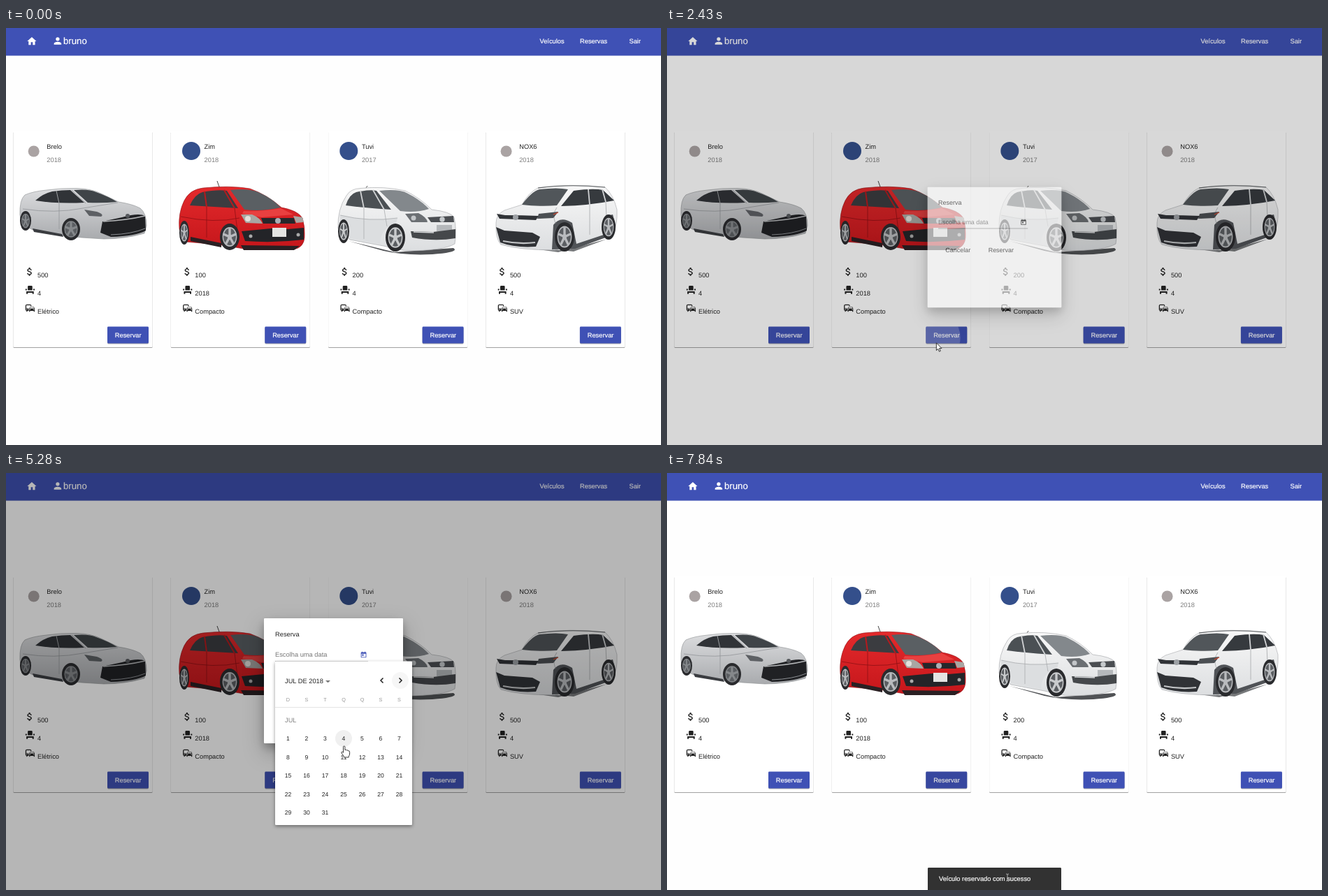
An HTML page for the animation above (8000 ms loop, 937x597 px).

```html
<!DOCTYPE html>
<html lang="pt">
<head>
<meta charset="utf-8">
<title>Reserva de veículos</title>
<style>
html, body { margin: 0; width: 100%; height: 100%; overflow: hidden; background: #fefefe; }
svg { display: block; width: 937px; height: 597px; }
text { font: 9.3px "Liberation Sans", Arial, sans-serif; text-rendering: geometricPrecision; white-space: pre; }
text[fill="#fff"] { stroke: #fff; stroke-width: .2px; }
.mid { text-anchor: middle; }
.card { filter: drop-shadow(0 1px .7px rgba(0,0,0,.36)); }
.raised { filter: drop-shadow(0 1px .7px rgba(0,0,0,.3)); }
.pressed { filter: drop-shadow(0 2.5px 2.5px rgba(0,0,0,.42)); }
.dialog { filter: drop-shadow(0 6px 6px rgba(0,0,0,.22)) drop-shadow(0 11px 14px rgba(0,0,0,.26)); }
.panel { filter: drop-shadow(0 2px 2.5px rgba(0,0,0,.42)); }
</style>
</head>
<body>
<svg id="stage" viewBox="0 0 937 597" xmlns="http://www.w3.org/2000/svg"></svg>
<script>
const LOOP = 8000, BLUE = '#3f51b5', INK = '#222';

const ICONS = {
  home: 'M10 20v-6h4v6h5v-8h3L12 3 2 12h3v8z',
  person: 'M12 12a4 4 0 1 0 0-8 4 4 0 0 0 0 8zm0 2c-2.67 0-8 1.34-8 4v2h16v-2c0-2.66-5.33-4-8-4z',
  money: 'M11.8 10.9c-2.3-.6-3-1.2-3-2.15 0-1.1 1-1.85 2.7-1.85 1.8 0 2.4.85 2.5 2.1h2.2c0-1.7-1.1-3.3-3.2-3.8V3h-3v2.2c-1.9.4-3.5 1.6-3.5 3.6 0 2.3 1.9 3.4 4.7 4.1 2.5.6 3 1.5 3 2.4 0 .7-.5 1.8-2.7 1.8-2 0-2.9-.9-3-2.1H6.3c.1 2.2 1.8 3.4 3.7 3.8V21h3v-2.1c2-.4 3.5-1.5 3.5-3.6 0-2.8-2.4-3.8-4.7-4.4z',
  seat: 'M4 18v3h3v-3h10v3h3v-6H4zm15-8h3v3h-3zM2 10h3v3H2zm15 3H7V5a2 2 0 0 1 2-2h6a2 2 0 0 1 2 2z',
  commute: 'M12 4H5a3 3 0 0 0-3 3v8a3 3 0 0 0 3 3l-1 1v1h1l2-2h2v-5H4V6h9v2h2V7a3 3 0 0 0-3-3zM5 14a1 1 0 1 1 0 2 1 1 0 0 1 0-2zM20.6 9.7Q20.3 9 19.6 9h-7q-.7 0-1 .7L10 13.8V19.3q0 .7.7.7h.6q.7 0 .7-.8V18h8v1.2q0 .8.7.8h.6q.7 0 .7-.7v-5.5zM12.4 10h7.2l1 3h-9.2zM12 16a1 1 0 1 1 0-2 1 1 0 0 1 0 2zm8 0a1 1 0 1 1 0-2 1 1 0 0 1 0 2z',
  today: 'M19 3h-1V1h-2v2H8V1H6v2H5a2 2 0 0 0-2 2v14a2 2 0 0 0 2 2h14a2 2 0 0 0 2-2V5a2 2 0 0 0-2-2zm0 16H5V8h14zM7 10h5v5H7z'
};
const CURSORS = {
  arrow: 'M0 0V10.8L2.4 8.5L4.1 12.4L5.9 11.6L4.2 7.8H7.6Z',
  hand: 'M-1.5 9V1.2Q-1.5 0-.3 0T.9 1.2V5.5Q3 4.6 3.6 6Q5.3 5.4 5.8 6.8Q7.6 6.4 7.6 8.5V11Q7.6 13 6.3 14.5V16H-.8V14.5L-3.9 10Q-4.6 8.5-3.4 8Q-2.5 8-1.5 9.3Z',
  beam: 'M-2-5Q0-5 0-4Q0-5 2-5M0-4V4M-2 5Q0 5 0 4Q0 5 2 5'
};

const text = (x, y, s, fill = INK, extra = '') => `<text x="${x}" y="${y}" fill="${fill}" ${extra}>${s}</text>`;
const rect = (x, y, w, h, fill, extra = '') => `<rect x="${x}" y="${y}" width="${w}" height="${h}" fill="${fill}" ${extra}/>`;
const circle = (x, y, r, fill, extra = '') => `<circle cx="${x}" cy="${y}" r="${r}" fill="${fill}" ${extra}/>`;
const path = (d, fill, extra = '') => `<path d="${d}" fill="${fill}" ${extra}/>`;
const line = (d, color, w) => path(d, 'none', `stroke="${color}" stroke-width="${w}"`);
const icon = (name, x, y, fill, k = .66, id = '') =>
  path(ICONS[name], fill, `transform="translate(${x} ${y}) scale(${k})" ${id}`);

// Cars
const wheel = (x, y, rx, ry, rim = '#b9bbbe') => {
  const oval = (k, fill) => `<ellipse cx="${x}" cy="${y}" rx="${rx * k}" ry="${ry * k}" fill="${fill}"/>`;
  const spokes = Array.from({ length: 5 }, (_, i) => {
    const a = (i * 72 - 90) * Math.PI / 180;
    return `M${x} ${y}L${x + Math.cos(a) * rx * .66} ${y + Math.sin(a) * ry * .66}`;
  }).join('');
  return oval(1, '#2a2b2e') + oval(.74, rim) + oval(.64, '#5b5e62') + line(spokes, rim, rx * .24) + oval(.2, rim);
};
const shell = (d, fill, edge) => path(d, fill, `stroke="${edge}" stroke-width=".6"`);
const CARS = [
  () => shell('M20 268Q19 246 27 239Q38 234 58 232Q78 229 101 229.500Q122 230 136 237L161 249Q181 252 192 258Q201 265 201 283L198 294Q170 302 140 302L108 300L78 297L38 289L22 280Z', 'url(#silver)', '#8d9093') +
    path('M38 287L80 295L82 299L40 292Z', '#3a3c40') +
    path('M42 247Q53 237 66 234Q80 232 92 232L112 250Q72 252 42 247Z', '#303337') +
    path('M97 232Q119 230 129 235Q146 241 159 249Q137 251 117 250Z', '#3f4448') +
    line('M72 233L76 251V288M94 232L114 251', '#9a9da0', 1) + line('M24 259Q70 266 110 258L160 250', '#8b8e92', .7) +
    path('M112 260L130 263Q141 267 136 270L119 269Z', '#5d6064') +
    path('M138 277L166 271Q190 264 199 269L200 290Q186 298 150 299L135 293Z', '#202124') +
    line('M139 277Q174 275 199 269', '#b5b7b9', 1.4) + line('M150 296Q180 295 199 287', '#8b8e92', 1) + circle(174, 269, 3, '#55585c') +
    wheel(28, 276, 8, 14, '#85888b') + wheel(93, 288, 13, 16, '#85888b'),
  () => line('M306 230L302 219', '#444', 1) +
    shell('M248 288Q246 265 255 247Q263 231 282 229Q320 225 349 230Q374 239 394 257Q417 261 424 272Q428 285 427 300Q426 314 412 317L340 316L304 310L256 306Z', 'url(#red)', '#8f1015') +
    path('M264 299L308 308V314L264 305ZM336 311L420 312L412 318H340Z', '#2a2023') +
    path('M263 254Q270 238 281 235Q302 231 316 233L332 258Q298 256 263 254Z', '#3b3c40') +
    path('M321 232Q349 229 363 236Q381 244 393 257Q366 263 341 260Z', '#5a5f63') +
    path('M340 262Q367 263 393 258L411 267L366 271L338 266Z', '#e84040') +
    line('M284 234L287 256M312 232L327 258', '#b51a1e', 2) + line('M287 256V300M327 258L331 290M250 270Q298 280 334 272', '#8f1015', .8) +
    path('M336 267L352 267Q364 272 367 280L343 279Z', '#a9a7a3') + circle(346, 273, 4, '#e2e1dc') +
    path('M411 269L424 271L426 278L415 279Z', '#a9a7a3') +
    path('M365 272H412L414 280H368Z', '#26272b') + circle(389, 276, 4, '#aab0b6') +
    path('M337 291L379 287L403 288L426 286V303Q385 308 342 305Z', '#232428') +
    rect(381, 286, 20, 13, '#e4e4e2') + circle(350, 298, 2.5, '#aaa') + circle(418, 296, 2.5, '#aaa') +
    wheel(255, 293, 7, 17) + wheel(320, 299, 14, 19),
  () => path('M490 305L556 321L640 315Q650 321 610 324Q570 326 540 319Z', '#505255') +
    line('M513 232L517 226', '#555', 1) +
    shell('M475 287Q474 259 487 240Q493 230 507 229.500Q540 226 571 233Q592 243 609 260Q636 263 641 271Q645 288 642 309Q626 319 571 319L540 312L492 303Z', 'url(#white)', '#9fa1a4') +
    path('M478 268Q519 277 560 272L558 280Q536 286 535 309L492 301Q493 282 478 276Z', '#dcdee0') +
    path('M486 254Q491 238 501 235Q520 231 530 233L551 260Q518 258 486 254Z', '#4b5054') +
    path('M534 233Q561 230 573 236Q593 246 605 259Q587 265 564 262Z', '#83888c') +
    line('M507 233L512 258M525 232L541 260', '#d0d2d4', 1.8) + line('M512 258V302M541 260L545 284M478 268Q519 278 560 272', '#aaadaf', .8) +
    path('M571 266L590 265Q602 271 603 278L580 278Z', '#6b6f73') + circle(583, 272, 3.5, '#c3c6c9') +
    path('M603 271L640 269L641 278H608Z', '#4b4e52') + circle(624, 274, 3.7, '#c5c9cc') +
    rect(616, 282, 22, 9, '#b5b8bb') + path('M579 291L611 292L643 288V301Q614 306 581 300Z', '#45484b') +
    line('M583 292L612 293', '#d4d6d8', 1.5) +
    wheel(483, 291, 8, 17, '#c9cbcd') + wheel(557, 300, 14, 20, '#c9cbcd'),
  () => path('M706 309L790 321L860 302L812 320Z', '#77797b') +
    shell('M701 279Q701 267 713 261L738 253Q748 235 761 229Q805 222 857 228Q869 239 874 260Q875 284 868 293L814 311L785 318Q735 318 708 310Q700 302 701 279Z', 'url(#white)', '#a5a7a9') +
    path('M783 282Q793 268 810 279L816 309L858 295Q850 270 868 267L872 283L866 297L814 316L781 317Z', '#505357') +
    path('M738 253Q752 234 763 231Q789 228 804 231L788 254Q765 256 738 253Z', '#51565a') +
    path('M794 255L812 233Q840 229 854 232L870 247Q835 254 794 255Z', '#363a3e') +
    line('M761 229Q805 223 857 228', '#5c5f62', 1.2) + line('M833 231L835 253M853 231L858 249', '#d0d2d4', 1.8) +
    line('M835 253V296M858 249L859 272M788 257Q781 266 786 280', '#a5a8aa', .8) +
    path('M762 266L790 263L783 272L760 273Z', '#4b4f53') + line('M783 267L790 264', '#d8482e', 1.3) +
    path('M702 266L714 268Q738 268 762 269L758 275L706 273Z', '#303337') + circle(729, 271, 4, '#9da1a5') +
    path('M701 285L713 290L753 293L764 299L758 313Q728 315 707 307Z', '#303236') +
    line('M711 305Q735 310 757 307', '#c3c5c7', 2) +
    wheel(799, 299, 14, 21) + wheel(862, 285, 10, 18)
];

const VEHICLES = [
  ['Brelo', 2018, 500, 4, 'Elétrico', 0],
  ['Zim', 2018, 100, 2018, 'Compacto', 1],
  ['Tuvi', 2017, 200, 4, 'Compacto', 1],
  ['NOX6', 2018, 500, 4, 'SUV', 0]
];
const card = ([name, year, price, seats, kind, round], i) => {
  const x = 10.5 + 225.3 * i;
  return rect(x, 148, 199, 309, '#fff', 'class="card" rx="1.3"') +
    (round ? circle(x + 29.2, 176, 13, '#344f8b') : circle(x + 29.2, 176.5, 8, '#aaa3a3')) +
    text(x + 47.8, 173, name) + text(x + 47.8, 191.5, year, '#7d7d7d') + CARS[i]() +
    icon('money', x + 15.5, 341, INK) + icon('seat', x + 16, 367, INK) + icon('commute', x + 16, 393, INK) +
    text(x + 34.5, 356.5, price) + text(x + 34.5, 382.5, seats) + text(x + 34.5, 408.5, kind) +
    rect(x + 134.5, 427.6, 59, 23.8, BLUE, `class="raised" id="btn${i}" rx="1.4"`) +
    text(x + 164.2, 442.7, 'Reservar', '#fff', 'class="mid"');
};
const gradient = (id, a, b) => `<linearGradient id="${id}" x2="0" y2="1"><stop stop-color="${a}"/><stop offset="1" stop-color="${b}"/></linearGradient>`;

document.getElementById('stage').innerHTML =
  `<defs>${gradient('silver', '#dcdddf', '#a9abae')}${gradient('red', '#e42a2c', '#c5161b')}${gradient('white', '#f8f8f8', '#dcdee0')}
    <clipPath id="clipCard"><rect x="370.3" y="427.6" width="59" height="23.8" rx="1.4"/></clipPath>
    <clipPath id="clipOk"><rect x="449" y="289" width="59" height="24" rx="1.4"/></clipPath></defs>` +
  rect(0, 0, 937, 597, '#fefefe') + rect(0, 0, 937, 39.6, BLUE) +
  icon('home', 29, 11, '#fff') + icon('person', 66, 10.5, '#fff') +
  text(82, 23, 'bruno', '#fff', 'style="font-size:13.2px"') +
  text(763.5, 22, 'Veículos', '#fff') + text(821, 22, 'Reservas', '#fff') + text(891.5, 22, 'Sair', '#fff') +
  VEHICLES.map(card).join('') +
  rect(370.3, 427.6, 59, 23.8, '#000', 'id="focus" rx="1.4"') +
  `<g clip-path="url(#clipCard)">${circle(382, 443, 0, '#fff', 'id="rip1"')}</g>` +
  rect(0, 0, 937, 597, '#000', 'id="shade"') +
  `<g id="dialog">${rect(369, 208, 199, 179, '#fff', 'class="dialog" rx="1.3"')}
    ${text(385, 234, 'Reserva')}${text(385, 263, 'Escolha uma data', '#777', 'id="label"')}
    ${text(385, 263, '03/07/2018', INK, 'id="date"')}
    ${line('M385 269.5H518', '#8c8c8c', .8)}
    ${circle(511.5, 260, 7, BLUE, 'id="halo"')}${icon('today', 506.4, 255.3, INK, .43, 'id="today"')}
    ${rect(449, 289, 59, 24, '#000', 'id="ok" rx="1.4"')}
    <g clip-path="url(#clipOk)">${circle(466, 303, 0, '#000', 'id="rip2"')}</g>
    ${text(414.3, 304.3, 'Cancelar', INK, 'class="mid"')}${text(478.2, 304.3, 'Reservar', INK, 'class="mid"')}</g>
  <g id="panel">${rect(385, 269.5, 196, 234.5, '#fff', 'class="panel" rx="1.3"')}<g id="month"></g></g>
  <g id="toast">${rect(373, 565, 191, 34, '#323232', 'rx="1.4"')}${text(389, 584.3, 'Veículo reservado com sucesso', '#fff')}</g>` +
  path('', '#fff', 'id="cursor" stroke-linejoin="round"');

const parts = {};
document.querySelectorAll('[id]').forEach(e => parts[e.id] = e);
const set = (id, attrs) => { for (const k in attrs) parts[id].setAttribute(k, attrs[k]); };

// Timing
const clamp = u => Math.min(1, Math.max(0, u));
const out2 = u => 1 - (1 - clamp(u)) ** 2;
// cubic-bezier(.25, .8, .25, 1)
function ease(u) {
  if (u <= 0) return 0;
  if (u >= 1) return 1;
  let lo = 0, hi = 1, s;
  for (let i = 0; i < 20; i++) {
    s = (lo + hi) / 2;
    if (.75 * (1 - s) * s + s ** 3 < u) lo = s; else hi = s;
  }
  return 2.4 * (1 - s) ** 2 * s + 3 * (1 - s) * s * s + s ** 3;
}

// The screen refreshes in bursts and rests between them: start, end, count.
const BURSTS = [[250, 1020, 11], [1100, 1100, 1], [1250, 1250, 1], [1720, 2180, 7], [2360, 2490, 3], [2570, 3110, 8],
  [3180, 3970, 11], [4050, 4820, 11], [4890, 5660, 11], [5740, 6520, 11], [6590, 7230, 9], [7380, 7840, 7]];
const STEPS = BURSTS.flatMap(([a, b, n]) =>
  Array.from({ length: n }, (_, i) => n > 1 ? Math.round((a + (b - a) * i / (n - 1)) / 10) * 10 : a));
const hold = t => STEPS.reduce((last, s) => s <= t ? s : last, 0);

const TRACK = [[250, 860, 584], [1020, 154, 445], [1100, 148, 440], [1250, 166, 440], [1720, 190, 448], [2180, 382, 443],
  [2360, 382, 443], [2490, 388, 457], [3110, 511, 261], [3340, 511, 261], [3810, 517, 372], [3970, 525, 364],
  [4280, 563, 298], [4560, 563, 298], [4820, 552, 354], [5280, 484, 391], [5660, 454, 386], [5980, 454, 386],
  [6520, 466, 303], [6830, 466, 303], [7300, 468, 433], [7840, 487, 579]];
const HANDS = [[1020, 1720], [3020, 3420], [4200, 4740], [5000, 6150], [6420, 6990]];
function pointer(t) {
  const i = TRACK.findIndex(k => k[0] > t);
  if (i < 0) return TRACK[TRACK.length - 1].slice(1);
  if (i === 0) return TRACK[0].slice(1);
  const [t0, x0, y0] = TRACK[i - 1], [t1, x1, y1] = TRACK[i];
  const u = (t - t0) / (t1 - t0), k = u * u * (3 - 2 * u);
  return [x0 + (x1 - x0) * k, y0 + (y1 - y0) * k];
}

// Calendar
function month(t, mx, my) {
  const july = t >= 4520, name = july ? 'JUL' : 'JUN', x0 = 403.5, gap = 26.5;
  const tri = july ? 457 : 459;
  let s = text(399, 301, name + ' DE 2018') + path(`M${tri} 297h7l-3.5 3.3z`, '#777');
  if (t >= 4200) s += circle(564, 297, 12, '#000', 'opacity=".035"');
  s += line('M539.5 293.5L536 297L539.5 300.5', july ? INK : '#b8b8b8', 1.5) + line('M562.5 293.5L566 297L562.5 300.5', INK, 1.5);
  [...'DSTQQSS'].forEach((d, i) => s += text(x0 + gap * i, 327, d, '#999', 'class="mid" style="font-size:7.3px"'));
  s += line('M385 335.5H581', '#dedede', .8) + text(399, 357.2, name, '#808080');
  const first = july ? 7 : 5, total = july ? 31 : 30;
  for (let d = 1; d <= total; d++) {
    const cell = first + d - 1, x = x0 + gap * (cell % 7), y = 353.5 + gap * Math.floor(cell / 7);
    const today = !july && d === 30, picked = july && d === 3 && t >= 5890;
    const hover = july && Math.abs(mx - x) < 13.2 && Math.abs(my - y) < 13.2;
    if (today) s += circle(x, y, 11.6, '#f3f3f3', 'stroke="#808080" stroke-width=".8"');
    else if (picked) s += circle(x, y, 12, BLUE);
    else if (hover) s += circle(x, y, 12, '#f0f0f0');
    s += text(x, y + 3.1, d, picked ? '#fff' : july || today ? INK : '#9e9e9e', 'class="mid" style="font-size:8.6px"');
  }
  return s;
}

function draw(t) {
  const [mx, my] = pointer(t);
  const leave = ease((t - 6790) / 400);

  set('btn1', { class: t >= 2300 && t < 2430 ? 'pressed' : 'raised' });
  set('focus', { opacity: t >= 6830 ? .12 : 0 });
  set('rip1', { r: 49 * out2((t - 2238) / 370), opacity: .22 * (1 - clamp((t - 2600) / 350)) });
  set('shade', { opacity: .288 * (ease((t - 2363) / 400) - leave) });

  const p = ease((t - 2361) / 325), k = .9 + .1 * p;
  set('dialog', {
    opacity: p * (1 - leave),
    transform: `translate(468.5 ${297.5 + 45 * (1 - p)}) scale(${k}) translate(-468.5 -297.5)`
  });
  const chosen = t >= 5890, lift = ease((t - 5860) / 400), open = t >= 3250 && t < 5980;
  set('label', { y: 263 - 14 * lift, style: `font-size:${9.3 - 2.3 * lift}px` });
  set('date', { opacity: chosen ? 1 : 0 });
  set('today', { fill: open ? BLUE : INK });
  set('halo', { opacity: t >= 3180 && t < 4000 ? .13 : 0 });
  set('ok', { opacity: t >= 6650 ? .12 : t >= 6430 ? .04 : 0 });
  set('rip2', { r: 45 * out2((t - 6657) / 370), opacity: .11 });

  const grow = ease((t - 3250) / 400), fade = 1 - clamp((t - 5960) / 100);
  set('panel', { opacity: grow * fade, transform: `translate(0 269.5) scale(1 ${grow}) translate(0 -269.5)` });
  parts.month.innerHTML = grow * fade > 0 ? month(t, mx, my) : '';

  set('toast', { transform: `translate(0 ${34 * (1 - ease((t - 7450) / 300))})` });

  const kind = t >= 7750 ? 'beam' : HANDS.some(([a, b]) => t >= a && t < b) ? 'hand' : 'arrow';
  set('cursor', {
    d: CURSORS[kind], transform: `translate(${mx} ${my})`, opacity: t >= 250 ? 1 : 0,
    fill: kind === 'beam' ? 'none' : '#fff', stroke: kind === 'beam' ? '#bbb' : '#222', 'stroke-width': .9
  });
}

function tick(now) {
  draw(hold(now % LOOP));
  requestAnimationFrame(tick);
}
draw(0);
requestAnimationFrame(tick);
</script>
</body>
</html>
```
